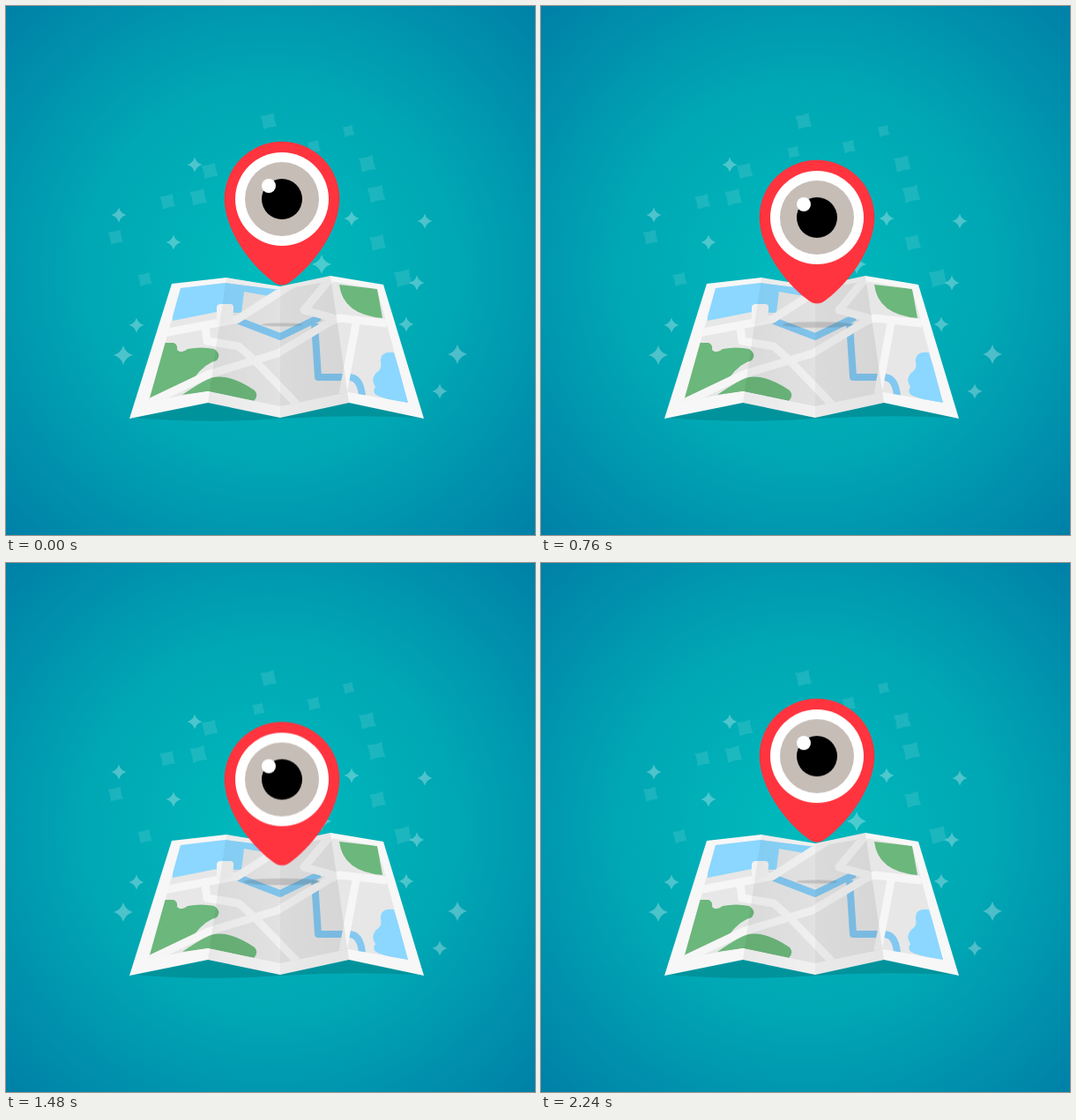
An HTML page that plays this animation: 600 px wide and 600 px high, repeating every 2.28 s.

```html
<!DOCTYPE html>
<html lang="en">
<head>
<meta charset="utf-8">
<title>Map pin</title>
<style>
  html, body { margin: 0; width: 100%; height: 100%; overflow: hidden; background: #00a0b2; }
  svg { display: block; width: 100vw; height: 100vh; }
  .road { fill: none; stroke: #f6f6f6; stroke-width: 9; stroke-linejoin: round; }
  .river { fill: none; stroke: #83c8f1; stroke-width: 8; stroke-linejoin: round; }
  .lake { fill: #8bd7ff; }
  .park { fill: #6cb77b; }

  .pin { animation: bob 2280ms infinite; }
  .shadow { transform-origin: 313px 361.5px; animation: spread 2280ms infinite; }
  .pin, .shadow { animation-timing-function: cubic-bezier(.37, 0, .63, 1); }
  .lid { clip-path: inset(0 0 100% 0); animation: blink 2280ms linear infinite; }

  @keyframes bob {
    0%, 5.4%, 100% { transform: translateY(0); }
    50%, 54.8% { transform: translateY(30px); }
  }
  @keyframes spread {
    0%, 5.4%, 100% { transform: scale(.5); }
    50%, 54.8% { transform: scale(1); }
  }
  @keyframes blink {
    0%, 10.53% { clip-path: inset(0 0 100% 0); }
    17.54% { clip-path: inset(0 0 0 0); }
    22.81%, 100% { clip-path: inset(0 0 100% 0); }
  }
</style>
</head>
<body>
<svg viewBox="0 0 600 600">
  <defs>
    <radialGradient id="sea" gradientUnits="userSpaceOnUse" cx="300" cy="300" r="424">
      <stop offset="0" stop-color="#00bbbd"/>
      <stop offset=".5" stop-color="#00a7b4"/>
      <stop offset="1" stop-color="#0080a7"/>
    </radialGradient>
    <linearGradient id="foldLeft">
      <stop offset="0" stop-opacity=".06"/>
      <stop offset="1" stop-opacity=".025"/>
    </linearGradient>
    <linearGradient id="foldRight">
      <stop offset="0" stop-opacity=".055"/>
      <stop offset="1" stop-opacity=".075"/>
    </linearGradient>
    <clipPath id="land">
      <path d="M198 320L249 314L311 322L368 312L421 321L456 450L388 438L311 454L229 437L162 448Z"/>
    </clipPath>
  </defs>

  <rect width="600" height="600" fill="url(#sea)"/>
  <g id="stars" fill="#fff"></g>

  <!-- map -->
  <path d="M145 467L229 446L311 462L389 446L468 467Q390 463 311 468Q225 474 145 467Z" fill="#00939c"/>
  <path d="M188 315L250 308L311 318L368 306L428 316L474 468L389 450L311 467L229 450L140 468Z" fill="#f7f7f7"/>
  <g clip-path="url(#land)">
    <rect x="140" y="300" width="340" height="170" fill="#e7e7e7"/>
    <path class="lake" d="M190 310H250L312 320L304 330L270 324L267 348L239 347L189 357Z"/>
    <path class="river" d="M264 357L311 375L356 353M350 360L354 421H390Q402 422 404 442"/>
    <path class="lake" d="M440 393Q424 391 425 404Q427 412 420 416Q413 424 419 432Q414 440 424 443L460 455Z"/>
    <path class="park" d="M176 382H190Q195 384 194 390Q199 395 206 389Q222 386 236 389Q245 395 239 402Q226 405 214 421L160 447Z"/>
    <path class="park" d="M200 441Q226 423 236 421Q256 418 282 436Q287 442 281 448L229 437Z"/>
    <path class="park" d="M378 316L421 321L427 354Q382 350 378 316Z"/>
    <path class="road" d="M178 371L263 355L330 312M226 364L228 380L264 386L282 402L334 456"/>
    <path class="road" d="M158 452L229 418L308 394L368 358L378 354L432 360M368 309L338 345L372 354M397 360L382 440"/>
    <path d="M239 342Q239 338 244 338H254Q259 338 258 344L257 356L239 361Z" fill="#f3f3f3"/>
  </g>
  <path d="M250 308L311 318V467L229 450Z" fill="url(#foldLeft)"/>
  <path d="M311 318L368 306L389 450L311 467Z" fill="url(#foldRight)"/>

  <ellipse class="shadow" cx="313" cy="361.5" rx="46" ry="4" fill="#555" fill-opacity=".22"/>

  <g class="pin">
    <path d="M247.7 219A65.3 65.3 0 0 1 378.3 219C378 254 349 293 325 311Q313 322 301 311C277 293 248 254 247.7 219Z" fill="#ff343e"/>
    <circle cx="313" cy="219" r="53" fill="#fff"/>
    <circle cx="313" cy="219" r="42" fill="#c6bdb7"/>
    <circle cx="313" cy="219" r="23"/>
    <circle cx="298" cy="204" r="8" fill="#fff"/>
    <g class="lid">
      <circle cx="313" cy="217.3" r="44" fill="#ff343e"/>
      <circle cx="313" cy="217.3" r="35" fill="none" stroke="#f72831" stroke-width="4"/>
    </g>
  </g>
</svg>
<script>
  let seed = 11;
  const random = () => (seed = seed * 16807 % 2147483647) / 2147483647;
  const between = (low, high) => low + (high - low) * random();

  const star = (x, y, r, waist, turn, opacity) => {
    const k = r * waist;
    return `<path opacity="${opacity}" transform="translate(${x} ${y}) rotate(${turn})"
      d="M0 ${-r}Q${k} ${-k} ${r} 0Q${k} ${k} 0 ${r}Q${-k} ${k} ${-r} 0Q${-k} ${-k} 0 ${-r}Z"/>`;
  };

  // Dim stars fill an arch around the pin, from one map edge to the other.
  const dim = Array.from({ length: 13 }, (_, i) => {
    const angle = Math.PI * (1 + (i + random()) / 13);
    const reach = between(110, 205);
    return star(310 + reach * Math.cos(angle), 310 + reach * Math.sin(angle),
      between(8, 13), .4, 32, .11);
  });

  // Bright stars flank the map.
  const spots = '133,396 148,362 128,237 190,268 214,180 358,293 392,241 475,244 466,314 454,361 512,395 492,437';
  const bright = spots.split(' ').map((spot, i) =>
    star(...spot.split(','), i % 5 ? 8.5 : 11, .22, 0, .3));

  document.getElementById('stars').innerHTML = dim.concat(bright).join('');
</script>
</body>
</html>
```
